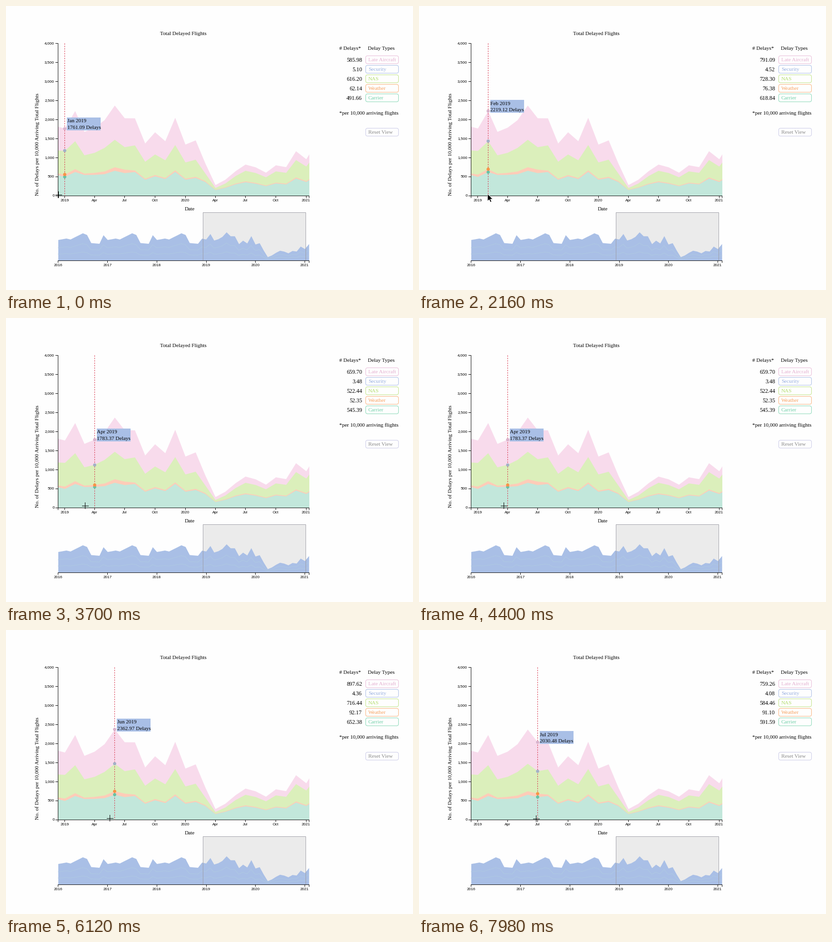
Write a matplotlib script that moves like this. It is 856 px wide and 596 px high and loops after 8000 ms.

```python
import numpy as np
import matplotlib.pyplot as plt
from matplotlib.animation import FuncAnimation
from matplotlib.patches import FancyBboxPatch, Polygon, Rectangle

W, H, DPI = 856, 596, 100
PT = 72 / DPI                       # points per pixel
INTERVAL, FRAMES = 40, 200
LEFT, RIGHT, TOP, BASE = 109.5, 637, 77.5, 397.5
TOP2, BASE2 = 433, 533.5
BRUSH = (414.5, TOP2), 216, BASE2 - TOP2
INK = "#111111"
GREEN, ORANGE, BLUE, PINK, LIME = ("#66c2a5", "#fc8d62", "#8da0cb",
                                   "#e78ac3", "#a6d854")

# Month, total, then late aircraft, security, NAS, weather, carrier
DETAIL = [
    ("Jan 2019", 1761.09, (585.98, 5.10, 616.20, 62.14, 491.66)),
    ("Feb 2019", 2219.12, (791.09, 4.52, 728.30, 76.38, 618.84)),
    ("Mar 2019", 1673.14, (615.05, 3.92, 477.18, 34.52, 542.46)),
    ("Apr 2019", 1783.37, (659.70, 3.48, 522.44, 52.35, 545.39)),
    ("May 2019", 1979.00, (727.11, 3.66, 614.36, 70.67, 563.20)),
    ("Jun 2019", 2362.97, (897.62, 4.36, 716.44, 92.17, 652.38)),
    ("Jul 2019", 2030.48, (759.26, 4.08, 584.46, 91.10, 591.59)),
]
# Monthly totals from Aug 2019 on
LATER = [2028, 1368, 1662, 1428, 2042, 1340, 1450, 850, 278, 418, 642, 815,
         742, 602, 795, 748, 1165, 955, 1380]

MONTHS = np.arange("2016-01", "2021-03", dtype="datetime64[M]")
DAYS = (MONTHS.astype("datetime64[D]")
        - np.datetime64("2019-01-01")).astype(int)
MAIN_X = 123.5 + DAYS[35:] * 0.6943
OVER_X = LEFT + (DAYS - DAYS[0]) * 0.2839
HOVER_X = MAIN_X[1:len(DETAIL) + 1]


def build_layers():
    """Cumulative carrier, weather, NAS and total for the main chart."""
    total = np.array([1830] + [row[1] for row in DETAIL] + LATER)
    month = np.arange(len(total))
    nas = total * np.interp(month, [14, 18], [0.65, 0.8])
    weather = total * np.interp(month, [12, 14, 16, 19, 25],
                                [0.325, 0.34, 0.56, 0.46, 0.4])
    layers = np.array([weather * 0.94, weather, nas, total])
    for i, (_, _, parts) in enumerate(DETAIL, 1):
        layers[:, i] = np.cumsum(parts[::-1])[[0, 1, 3, 4]]
    return layers


def overview_heights():
    """A repeated yearly shape for 2016-2018, then the monthly totals."""
    season = np.interp(np.arange(35) % 12, [0, 2, 3, 6, 7, 8, 10, 11],
                       [43, 46, 44, 57, 53.5, 36.5, 35, 53])
    return np.append(season, LAYERS[3] * 0.025)


def main_y(value):
    return BASE - np.asarray(value) * 0.08


def tint(color, alpha=0.4):
    rgb = np.array([int(color[i:i + 2], 16) for i in (1, 3, 5)]) / 255
    return tuple(1 - alpha * (1 - rgb))


LAYERS = build_layers()
fig = plt.figure(figsize=(W / DPI, H / DPI), dpi=DPI, facecolor="#fefefe")
ax = fig.add_axes([0, 0, 1, 1])
ax.set_xlim(0, W)
ax.set_ylim(H, 0)
ax.axis("off")


def text(x, y, s, size=11.2, font="Liberation Serif", color="#000000", **kw):
    return ax.text(x, y, s, fontsize=size * PT, family=font, color=color,
                   va="baseline", **kw)


def tick_text(x, y, s, ha="center"):
    text(x, y, s, 8.2, "Liberation Sans", ha=ha)


def line(xs, ys, color=INK, width=1, **kw):
    return ax.plot(xs, ys, color=color, lw=width * PT, **kw)[0]


def area(xs, ys, base, color):
    patch = ax.fill_between(xs, ys, base, color=color, lw=0)
    patch.set_clip_path(Rectangle((LEFT, TOP), RIGHT - LEFT, BASE2 - TOP,
                                  transform=ax.transData))


def pill(y, label, color, border=None):
    ax.add_patch(FancyBboxPatch(
        (756.5, y - 8.5), 69, 16.5, boxstyle="round,pad=0,rounding_size=4",
        fc="none", ec=border or tint(color, 0.65), lw=1.1 * PT))
    text(762, y + 3.5, label, color=tint(color, 0.85))


def draw_main():
    for values, color, alpha in zip(LAYERS[::-1], (PINK, LIME, ORANGE, GREEN),
                                    (0.31, 0.4, 0.45, 0.4)):
        area(MAIN_X, main_y(values), BASE, tint(color, alpha))
    line([LEFT, LEFT], [TOP, BASE])
    for value in range(0, 4001, 500):
        y = main_y(value)
        line([104.5, LEFT], [y, y])
        tick_text(101.8, y + 2.9, f"{value:,}", "right")
    line([LEFT, RIGHT], [BASE, BASE])
    for end in (LEFT, RIGHT):
        line([end, end], [BASE, 402])
    for i, x in enumerate(MAIN_X[1::3]):
        line([x, x], [BASE, 402])
        quarter = ("Jan", "Apr", "Jul", "Oct")[i % 4]
        tick_text(x, 410.3, quarter if i % 4 else str(2019 + i // 4))
    text(372.8, 61, "Total Delayed Flights", ha="center")
    text(386, 429, "Date", ha="center")
    text(69.3, 397.5, "No. of Delays per 10,000 Arriving Total Flights",
         rotation=90, rotation_mode="anchor")


def draw_overview():
    heights = overview_heights()
    ax.add_patch(Rectangle(*BRUSH, fc="#ebebeb", ec="none"))
    area(OVER_X, BASE2 - heights, BASE2, "#a9bfe6")
    for share in (0.61, 0.3):
        line(OVER_X, BASE2 - heights * share, "#b0cbe2", 0.8)
    ax.add_patch(Rectangle(*BRUSH, fc="none", ec="#9c9ca4", lw=0.9 * PT,
                           zorder=2.3))
    line([LEFT, RIGHT], [BASE2, BASE2], zorder=3)
    for i, x in enumerate(OVER_X[::12]):
        line([x, x], [BASE2, 538], zorder=3)
        tick_text(x, 546.3, str(2016 + i))
    line([RIGHT, RIGHT], [BASE2, 538], zorder=3)


def draw_legend():
    text(701, 92, "# Delays*")
    text(761.5, 92, "Delay Types")
    text(701, 228, "*per 10,000 arriving flights")
    pill(113, "Late Aircraft", "#dfa0c8")
    pill(133, "Security", "#86a2dc")
    pill(153, "NAS", LIME)
    pill(173, "Weather", "#f79447")
    pill(193, "Carrier", "#54c898")
    pill(265, "Reset View", "#777777", "#cfcfea")


draw_main()
draw_overview()
draw_legend()

rule = line([0, 0], [TOP, BASE], "#d83a50", 1.1, zorder=4,
            dashes=(2.4, 2.2), dash_capstyle="butt")
dots = [ax.plot([0], [0], "o", ms=6.8 * PT, mew=0, color=c, zorder=5)[0]
        for c in (GREEN, "#f79447", "#a3b0c6", "#d9b3cc")]
tip = ax.add_patch(Rectangle((0, 0), 71, 27, fc="#a9bfe6", ec="none",
                             zorder=6))
tip_text = [text(0, 0, "", zorder=7) for _ in range(2)]
counts = [text(749, y, "", 12, ha="right") for y in range(117, 198, 20)]
cross = [line([0, 0], [0, 0], "#000000", 1, zorder=8) for _ in range(2)]
ARROW = np.array([(0, 0), (0, 15.5), (3.6, 12.2), (6, 17.6), (8.6, 16.4),
                  (6.2, 11.2), (11, 11.2)])
arrow = ax.add_patch(Polygon(ARROW, closed=True, fc="#000000", ec="#ffffff",
                             lw=0.9 * PT, zorder=8))

# Pointer key points: time in ms, x
PATH_T = [0, 1200, 3140, 4400, 5520, 6740, 7980]
PATH_X = [110, 130.5, 158, 178, 207, 231, 247]


def update(frame):
    t = frame * INTERVAL
    mx = np.interp(t, PATH_T, PATH_X)
    my = 394.3 + 1.2 * np.cos(2 * np.pi * t / 8000)
    # The readout moves on once the pointer has passed the rule
    i = min(np.searchsorted(HOVER_X, mx - 1), len(DETAIL) - 1)
    name, total, parts = DETAIL[i]
    x, y = HOVER_X[i], main_y(total)

    rule.set_xdata([x, x])
    for dot, value in zip(dots, LAYERS[:, i + 1]):
        dot.set_data([x], [main_y(value)])
    tip.set_xy((x + 5, y - 22.8))
    for label, s, dy in zip(tip_text, (name, f"{total:.2f} Delays"),
                            (-12.4, 1.3)):
        label.set_position((x + 5.3, y + dy))
        label.set_text(s)
    for label, value in zip(counts, parts):
        label.set_text(f"{value:.2f}")

    # Touching the rule turns the crosshair into an arrow
    on_rule = abs(mx - x) <= 1
    cx, cy = np.floor(mx) + 0.5, np.floor(my) + 0.5
    cross[0].set_data([cx - 6.5, cx + 6.5], [cy, cy])
    cross[1].set_data([cx, cx], [cy - 6.5, cy + 6.5])
    for part in cross:
        part.set_visible(not on_rule)
    arrow.set_xy(ARROW + (mx, my))
    arrow.set_visible(on_rule)
    return [rule, *dots, tip, *tip_text, *counts, *cross, arrow]


anim = FuncAnimation(fig, update, frames=FRAMES, interval=INTERVAL,
                     init_func=lambda: update(0), repeat=True,
                     repeat_delay=0, blit=False)
plt.show()
```
